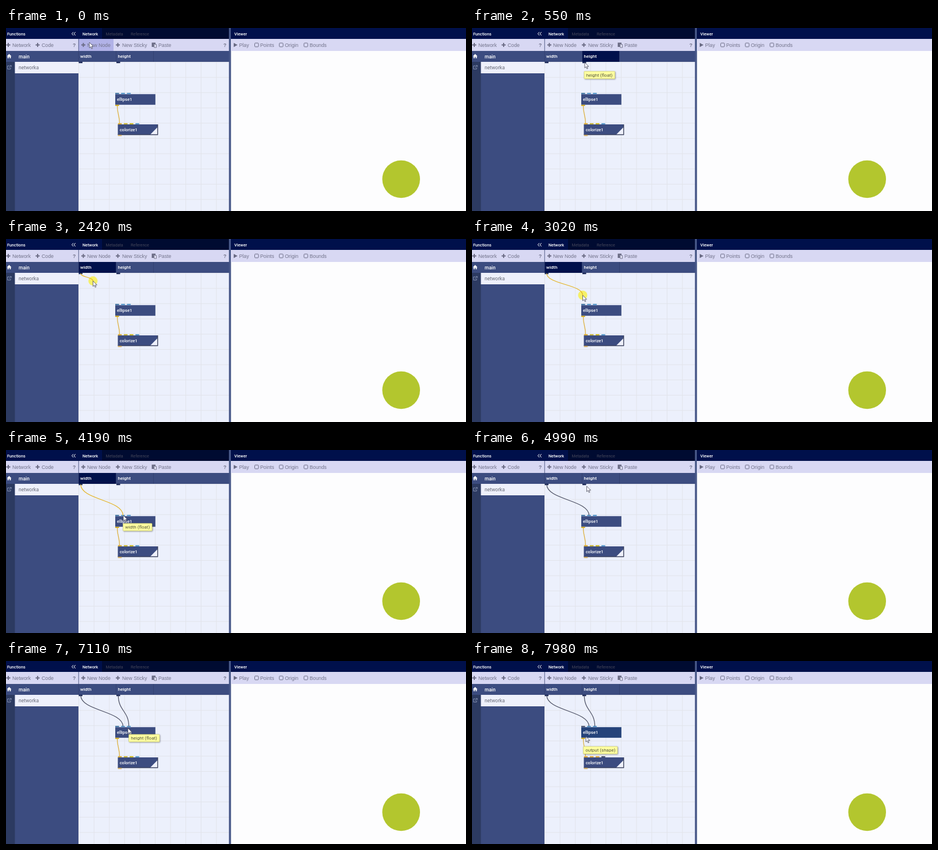
Recreate the animation shown at these times as an HTML page. Size 800 by 319 pixels, loop 8000 ms.

```html
<!DOCTYPE html>
<html lang="en">
<head>
<meta charset="utf-8">
<title>Connecting network inputs</title>
<style>
  html, body { margin: 0; width: 100%; height: 100%; overflow: hidden; background: #fdfdfe; }
  svg { display: block; width: 800px; height: 319px; }
  text { font: 8px Roboto, "Open Sans", sans-serif; fill: #fff; }
  .head { font-size: 7.2px; font-weight: 500; }
  .idle { font-size: 7.1px; fill: #45475a; }
  .side { font-size: 8.5px; }
  .tool { font: 8.75px "Liberation Sans", Arial, sans-serif; fill: #73748c; }
  .strong { font-weight: 500; }
  .node { font-size: 7.5px; font-weight: 500; }
  .icon { fill: none; stroke: #6a6b84; }
  .navy { fill: #00104b; }
  .bar { fill: #d8d8f3; }
  .blue { fill: #3c4c80; }
  .wire { fill: none; stroke-width: 1.2; }
  .tip rect { fill: #feff9f; stroke: #c9c978; stroke-width: .7; filter: drop-shadow(1px 1px 1px #0005); }
  .tip text { fill: #55553f; }
</style>
</head>
<body>
<svg viewBox="0 0 800 319">
  <defs>
    <pattern id="grid" x="126" y="59" width="26.6" height="26.6" patternUnits="userSpaceOnUse">
      <path d="M.5 0V26.6M0 .5H26.6" stroke="#e1e3ea" fill="none"/>
    </pattern>
    <path id="plus" class="icon" d="M0 0H7M3.5 -3.5V3.5" stroke-width="1.9"/>
    <rect id="box" class="icon" width="6.6" height="6.6" rx="1.3" stroke-width="1"/>
  </defs>

  <!-- functions panel -->
  <rect class="blue" width="126" height="319"/>
  <rect class="navy" width="126" height="19"/>
  <rect class="bar" y="19" width="126" height="21"/>
  <rect y="59" width="15.5" height="260" fill="#2c3a61"/>
  <rect x="15.5" y="59" width="110.5" height="20" fill="#eef0fb"/>
  <text class="head" x="2" y="12.5">Functions</text>
  <path d="M117.3 7L114.5 10L117.3 13M120.8 7L118 10L120.8 13" fill="none" stroke="#fff"/>
  <use href="#plus" x=".5" y="29.5"/><text class="tool" x="11" y="32.7">Network</text>
  <use href="#plus" x="51.5" y="29.5"/><text class="tool" x="62" y="32.7">Code</text>
  <text class="tool" x="116" y="32.7" font-weight="700" style="font-weight:700">?</text>
  <path d="M1.5 49.2L5.5 45.3L9.5 49.2H8.4V52.7H6.4V50.2H4.7V52.7H2.7V49.2Z" fill="#fff"/>
  <path d="M6 66H2.6V71.6H8V69M5 69.3L9 65.5M6.7 65.3H9.2V67.8" fill="none" stroke="#8d99b8" stroke-width=".9"/>
  <text class="side strong" x="22" y="52.5">main</text>
  <text class="side" x="22" y="71.8" style="fill:#676a78">networka</text>

  <!-- network panel -->
  <rect x="126" width="262" height="19" fill="#000b31"/>
  <rect class="navy" x="126" width="41" height="19"/>
  <text class="head" x="133" y="12.5">Network</text>
  <text class="idle" x="173.5" y="12.5">Metadata</text>
  <text class="idle" x="217" y="12.5">Reference</text>
  <rect class="bar" x="126" y="19" width="262" height="21"/>
  <rect id="newNode" x="126" y="19" width="61" height="21" fill="#b1b2e7"/>
  <use href="#plus" x="131" y="29.5"/><text class="tool" x="141" y="32.7">New Node</text>
  <use href="#plus" x="191" y="29.5"/><text class="tool" x="202" y="32.7">New Sticky</text>
  <path d="M253.5 25.5H260V28H257V33H253.5Z" fill="#6a6b84"/>
  <path d="M257.8 28.7H261.6V34H257.8Z" fill="#e4e4f7" stroke="#6a6b84" stroke-width=".9"/>
  <text class="tool" x="265" y="32.7">Paste</text>
  <text class="tool" x="378" y="32.7" style="font-weight:700">?</text>

  <rect x="126" y="59" width="262" height="260" fill="#ecf0fc"/>
  <rect x="126" y="59" width="262" height="260" fill="url(#grid)"/>
  <rect class="blue" x="126" y="40" width="262" height="19"/>
  <rect id="widthTab" class="navy" x="126" y="40" width="65" height="19"/>
  <rect id="heightTab" class="navy" x="192" y="40" width="64" height="19"/>
  <path d="M126.3 19V59M191.5 40V59M256.5 40V59" stroke="#33416f" stroke-width=".8"/>
  <text class="strong" x="129" y="51.7">width</text>
  <text class="strong" x="194.5" y="51.7">height</text>
  <path d="M126.5 60H133M192 60H198.5" stroke="#1d2a58" stroke-width="2.4"/>

  <!-- nodes -->
  <path class="wire" d="M193.5 135C193.5 151 197.5 151 197.5 167" stroke="#dcae38"/>
  <rect id="ellipse" x="190" y="115.3" width="69.8" height="18.5"/>
  <text class="node" x="193" y="127.4">ellipse1</text>
  <path id="firstPort" d="M190 114.2H196.6" stroke-width="2.2"/>
  <path d="M200.2 114.2H206.8M210.3 114.2H216.9" stroke="#5f9ed0" stroke-width="2.2"/>
  <path d="M190 134.9H196.6" stroke="#d6b02c" stroke-width="2.2"/>

  <rect x="194.5" y="168" width="69.6" height="18.3" fill="#3c4c80"/>
  <path d="M251 185.5L263.4 173V185.5Z" fill="#eef0fb"/>
  <path d="M194.5 186H263.8V168" fill="none" stroke="#35384c" stroke-width="1.1"/>
  <text class="node" x="197.7" y="180.2">colorize1</text>
  <g id="colorPorts" stroke-width="2.2"></g>
  <path d="M194.7 187.3H201.2" stroke="#d4ad62" stroke-width="2"/>

  <!-- viewer panel -->
  <rect x="387.7" width="3.6" height="319" fill="#485888"/>
  <rect class="navy" x="391" width="409" height="19"/>
  <text class="head" x="397" y="12.5">Viewer</text>
  <rect class="bar" x="391" y="19" width="409" height="21"/>
  <path d="M396 26L402.7 29.6L396 33.2Z" fill="#6a6b84"/>
  <text class="tool" x="405.5" y="32.7">Play</text>
  <use href="#box" x="432.5" y="26.2"/><text class="tool" x="442" y="32.7">Points</text>
  <use href="#box" x="475.3" y="26.2"/><text class="tool" x="485" y="32.7">Origin</text>
  <use href="#box" x="518.2" y="26.2"/><text class="tool" x="528" y="32.7">Bounds</text>
  <circle cx="687.2" cy="263.5" r="32.8" fill="#b3c62e"/>

  <!-- moving parts -->
  <circle id="press" r="8" fill="#f7f04e" opacity=".85"/>
  <path id="widthWire" class="wire"/>
  <path id="heightWire" class="wire"/>
  <path id="cursor" d="M0 0V9.6L2.3 7.6L3.9 11.2L5.4 10.5L3.9 7.1H7Z" fill="#f8f8ff" stroke="#3d3e4c" stroke-width=".75"/>
  <g id="tip" class="tip"><rect y=".4" height="13" rx="1"/><text x="3.7" y="9.6"></text></g>
</svg>
<script>
const LOOP = 8000;
const $ = id => document.getElementById(id);
const between = (t, a, b) => t >= a && t < b;
const show = (id, on) => $(id).setAttribute('visibility', on ? 'visible' : 'hidden');
const set = (id, attrs) => { for (const k in attrs) $(id).setAttribute(k, attrs[k]); };

// time, x, y of the pointer tip
const path = [
  [0, 145, 25], [30, 145, 25], [550, 196, 60], [740, 196, 60],
  [1540, 132, 61], [1600, 132, 61], [1880, 130, 59], [2120, 130, 59],
  [2870, 183, 94], [3020, 192.5, 98], [3660, 204, 114], [4540, 204, 114],
  [4990, 199.5, 63], [5220, 195.5, 59.5], [5570, 195.5, 59.5],
  [5990, 207.5, 95.5], [6380, 212, 117], [7889, 212, 117],
  [7890, 205, 124], [7969, 205, 124], [7970, 198, 131.5], [LOOP, 198, 131.5]
];

// start, end, x, y, label, box width
const tips = [
  [510, 800, 195, 75, 'height (float)', 53.5],
  [1490, 2200, 129.5, 75, 'width (float)', 50.5],
  [3620, 4620, 203.5, 127.5, 'width (float)', 50.5],
  [5180, 5630, 195, 75, 'height (float)', 53.5],
  [6300, 7890, 213.5, 127.5, 'height (float)', 53.5],
  [7970, LOOP, 193.5, 148.5, 'output (shape)', 59.5]
];

function pointer(t) {
  const i = Math.max(1, path.findIndex(k => k[0] > t));
  const [a, b] = [path[i - 1], path[i]];
  const f = (t - a[0]) / (b[0] - a[0]);
  return [a[1] + (b[1] - a[1]) * f, a[2] + (b[2] - a[2]) * f];
}

function wire(id, t, x, [tx, ty], start, linked) {
  const y = 60, mid = (y + ty) / 2;
  show(id, t >= start);
  set(id, {
    d: `M${x} ${y}C${x} ${mid} ${tx} ${mid} ${tx} ${ty}`,
    stroke: t < linked ? '#e4b321' : '#4a4d61'
  });
}

function ports(hover) {
  const colors = hover ? ['#e3a93b', '#e3a93b', '#e3a93b', '#4a5068'] : ['#dcae38', '#c9b63a', '#d0bd27', '#5f9ed0'];
  $('colorPorts').innerHTML = colors.map((c, i) =>
    `<path d="M${194.8 + 10.1 * i} 167H${201.3 + 10.1 * i}" stroke="${c}"/>`).join('');
}

let wasHover;
function draw(t) {
  const p = pointer(t), [x, y] = p;
  const overTabs = between(y, 40, 61.5);
  const dragWidth = between(t, 2120, 4270), dragHeight = between(t, 5470, 7110);
  const hover = t >= 7890;

  set('cursor', { transform: `translate(${x} ${y})` });
  show('newNode', y < 40 && x < 187);
  show('widthTab', dragWidth || overTabs && x < 191.5);
  show('heightTab', dragHeight || overTabs && x >= 191.5);

  show('press', between(t, 2120, 4190) || between(t, 5470, 6460));
  set('press', { cx: x, cy: y });
  wire('widthWire', t, 130, t < 4190 ? p : [203.5, 114], 2160, 4270);
  wire('heightWire', t, 195.3, t < 6460 ? p : [213.6, 114], 5610, 7110);

  if (hover !== wasHover) {
    wasHover = hover;
    set('ellipse', { fill: hover ? '#25437a' : '#3c4c80' });
    set('firstPort', { stroke: hover ? '#4f5872' : '#467aa6' });
    ports(hover);
  }

  const tip = tips.find(k => between(t, k[0], k[1]));
  show('tip', tip);
  if (tip) {
    const [, , tx, ty, label, w] = tip, g = $('tip');
    set('tip', { transform: `translate(${tx} ${ty})` });
    g.firstChild.setAttribute('width', w);
    g.lastChild.textContent = label;
  }
}

const begin = performance.now();
function tick() {
  draw((performance.now() - begin) % LOOP);
  requestAnimationFrame(tick);
}
tick();
</script>
</body>
</html>
```
